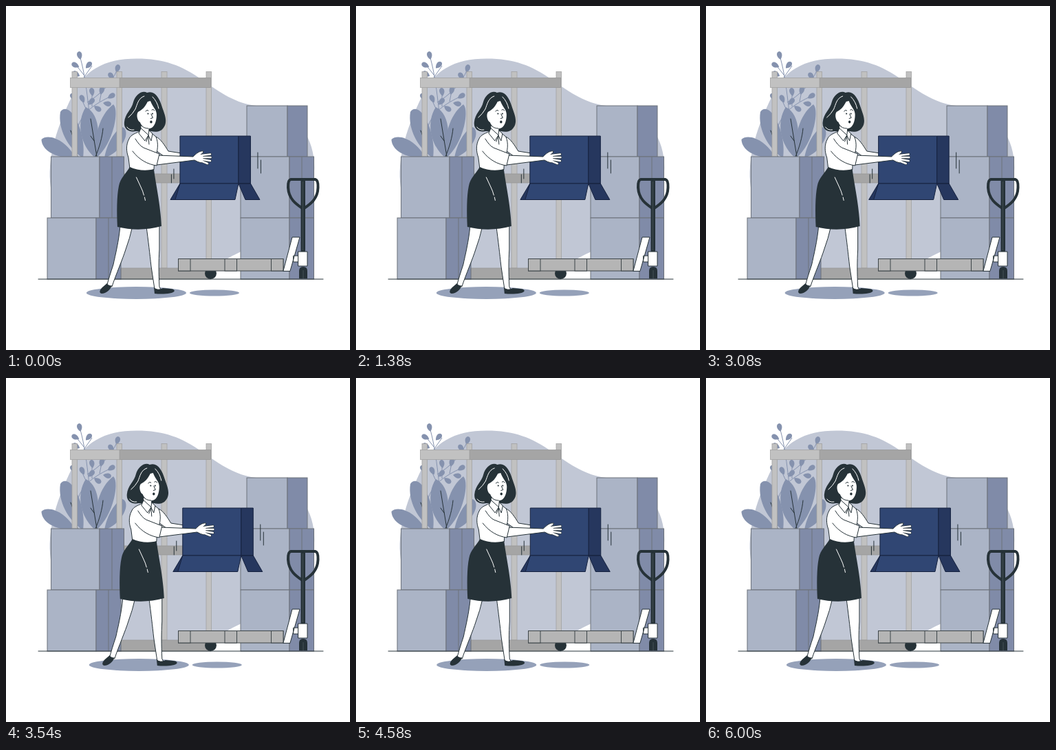
These frames come from a looping animation (500x500 px, 6.04 s). An HTML page:

```html
<!DOCTYPE html>
<html lang="en">
<head>
<meta charset="utf-8">
<title>Carrying a box</title>
<style>
  html, body { margin: 0; width: 100%; height: 100%; overflow: hidden; background: #fff; }
  svg { display: block; width: 100vw; height: 100vh; }
  .ink { fill: none; stroke: #263238; stroke-width: 1; stroke-linecap: round; stroke-linejoin: round; }
  .skin { fill: #fff; stroke: #263238; stroke-width: 1; stroke-linejoin: round; stroke-linecap: round; }
  .dark { fill: #263238; }
  .shine { fill: none; stroke: #fff; stroke-width: 1; stroke-linecap: round; }
  .leaf { fill: #8592ae; }
  .stem { fill: none; stroke: #8592ae; stroke-width: 1; }
  .front { fill: #abb4c6; stroke: #6c727b; }
  .side { fill: #808ba8; stroke: #6c727b; }
  .post { fill: #c1c1c1; stroke: #a2a2a2; stroke-width: .8; }
  .beam { fill: #a5a5a5; stroke: #969696; stroke-width: .8; }
  .pallet { fill: #b5b5b5; stroke: #3d4549; }
  .carton { fill: #304673; stroke: #16223f; stroke-linejoin: round; }
  .carton.shade { fill: #26375e; }
  .shadow { fill: #95a1b9; }
  .finger { fill: none; stroke: #fff; stroke-width: 2.6; stroke-linecap: round; }
  .finger.outline { stroke: #263238; stroke-width: 4; }
</style>
</head>
<body>
<svg viewBox="0 0 500 500">
  <path fill="#c1c7d5" d="M64 255C61 217 75 174 95 133C112 94 142 76.500 190 76.500C230 76.500 256 87 283 106C311 126 335 142 364 145C412 149 442 180 447 219C454 262 431 310 385 336C357 350 340 357 322 367C292 388 250 396 190 393C115 387 69 318 64 255Z"/>

  <g id="plant">
    <path class="stem" d="M126 200C120 150 117 105 107 72M113 104L125 87M113 100L102 86M104 178C110 154 130 142 153 131M117 151L110 136M125 146L125 126M136 139L139 124M118 140C135 130 152 115 162 92"/>
    <path class="leaf" d="M99 221C70 221 52 209 51.500 194C58 187 73 191 83 199C93 207 99 215 99 221Z"/>
    <path class="leaf" d="M112 221C90 207 75 178 79 154C84 146 93 150 99 160C109 176 115 200 112 221Z"/>
    <path class="leaf" d="M130 221C107 202 102 168 116 147C127 152 133 165 134 182C135 198 133 210 130 221Z"/>
    <path class="leaf" d="M131 221C127 190 136 158 156 143C161 148 160 162 157 175C152 194 144 210 131 221Z"/>
    <path class="leaf" d="M143 221C147 199 158 181 169 176C176 178 176 188 171 197C165 208 155 217 143 221Z"/>
    <path class="ink" d="M104 219C101 204 98 191 94 181M132 219L123 164M130 219C136 205 140 190 141 178M128 196L123 189"/>
  </g>

  <g id="shelf"></g>
  <g id="stacks"></g>

  <path class="ink" d="M47 397H461"/>

  <g id="shadows">
    <ellipse class="shadow" cx="189.500" cy="417" rx="72.500" ry="9"/>
    <ellipse class="shadow" cx="303" cy="417" rx="36" ry="4.500"/>
  </g>

  <g id="jack">
    <circle class="dark" cx="297.500" cy="388.500" r="8.500"/>
    <g id="pallet"></g>
    <path class="skin" d="M403 385L416 336H427L413 385ZM418 363H426V372H418Z"/>
    <path class="dark" d="M428.500 252H435V358H428.500ZM426 396V385Q426 379 432 379T438 385V396Z"/>
    <path d="M414 252H449.500Q454 253 453.500 264C453 281 442 288 432 295C422 288 411 281 410 264Q409.500 253 414 252Z" fill="none" stroke="#263238" stroke-width="4"/>
    <path d="M431.500 255V355M432 384V396" fill="none" stroke="#59666b" stroke-width=".6"/>
    <rect class="skin" x="425" y="357" width="13" height="21"/>
  </g>

  <g id="carrier">
    <g id="legs">
      <path class="skin" d="M166 320C164 342 159 362 156 376Q150 394 147 405L154 408C160 390 170 367 174 354Q180 338 184 320Z"/>
      <path class="skin" d="M204 320C207 342 209 360 211 378L216 411L226 414L223 408C222 389 222 370 223 354V318Z"/>
      <path class="dark" d="M147 403Q149 408 154 406C152 412 146 418 139 418C135 417 136 413 140 409Z"/>
      <path class="dark" d="M215 408C217 413 224 412 228 410C235 411 244 410 245 414C243 419 225 419 216 418Z"/>
    </g>

    <path class="skin" d="M218 190C225 193 231 203 236 211L255 214V219L229 218L214 207Z"/>

    <g id="carton">
      <path class="carton" d="M253 189H338V258H253Z"/>
      <path class="carton shade" d="M338 189H355.500V258H338ZM338 258H355.500L369 281.500H348ZM253 258L239 281.500H247Z"/>
      <path class="carton" d="M253 258H338L333 281.500H246Z"/>
    </g>
    <path class="ink" d="M244 237V251M240.500 245V257M366 213V236M370.500 224V243"/>

    <path class="dark" d="M205 126C198 122 188 129 185 140C183 150 173 156 172 169C171 179 179 184 189 182L211 182C219 184 226 182 229 177C236 168 230 156 227 147C223 133 216 122 205 126Z"/>
    <path class="skin" d="M196 174V181C190 185 182 186 179 193C174 202 175 212 178 220L180 236C190 240 205 241 215 238L216 222C221 211 222 199 218 190L208 182V175Z"/>
    <path fill="#fff" d="M206 139C202 147 198 151 192 154C189 158 191 167 195 169C197 175 203 179 209 178C216 177 219 167 219 158C219 150 213 147 210 138Z"/>
    <path class="ink" d="M196 173Q200 178 207 178M203 153Q205 150 207 152M212 151Q214 149 216 152M211 157L213.500 162.500L210.500 163.500"/>
    <circle class="dark" cx="206.500" cy="156.500" r="1.100"/>
    <circle class="dark" cx="213" cy="156.500" r="1.100"/>
    <ellipse class="dark" cx="211" cy="168.500" rx="1.700" ry="2"/>
    <path class="shine" d="M201 131C192 134 191 143 188 150Q184 157 178 162M176 176Q179 181 186 180M213 132Q220 139 222 149"/>
    <path class="skin" d="M196 178L193 185L202 196L207 188ZM208 181L207 188L211 196L213 186Z"/>
    <path class="ink" d="M207 189L204 197M207 189L208 201"/>

    <path class="dark" d="M180 234C190 239 205 240 215 237C217 255 225 290 226 320C205 326 182 326 162 321C161 300 161 276 164 262C166 250 175 243 180 234Z"/>
    <path class="shine" d="M189.500 249L196 263Q199 269 200.500 275M201.500 278L202.500 282.500"/>

    <g id="hand"></g>
    <path fill="#fff" d="M181 192C187 191 193 199 199 206L223 215L219 232C207 230 194 224 186 214Z"/>
    <path class="ink" d="M188 193Q194 203 200 206L223 215L219 232C206 230 194 224 184 211"/>
  </g>
</svg>
<script>
const byId = id => document.getElementById(id);

function shape(parent, tag, attributes) {
  const node = document.createElementNS("http://www.w3.org/2000/svg", tag);
  for (const [name, value] of Object.entries(attributes)) node.setAttribute(name, value);
  parent.append(node);
}

function rect(parent, type, left, top, right, bottom) {
  shape(parent, "rect", { class: type, x: left, y: top, width: right - left, height: bottom - top });
}

function sprigLeaf(x, y, angle, size = 6) {
  shape(byId("plant"), "path", {
    class: "leaf",
    d: `M0 ${size}C${-size} 0 ${-size * .6} ${-size} 0 ${-size}C${size * .6} ${-size} ${size} 0 0 ${size}Z`,
    transform: `translate(${x} ${y}) rotate(${angle})`
  });
}

function stackedBox(left, top, fold, right, bottom, seam) {
  const stacks = byId("stacks");
  rect(stacks, "front", left, top, fold, bottom);
  rect(stacks, "side", fold, top, right, bottom);
  if (seam) shape(stacks, "path", { class: "side", d: `M${seam} ${top}V${bottom}` });
}

function buildHand() {
  const hand = byId("hand");
  const fingers = "M284 217L297 215.500M285 220L297.500 220M285 223L297 225M283 225L293 229";
  shape(hand, "path", { class: "finger outline", d: fingers });
  shape(hand, "path", {
    class: "skin",
    d: "M221 217L272 219C277 214 282 210 287 211Q288 213 283 216L287 218V224L284 228Q279 227 274 224L219 231Z"
  });
  shape(hand, "path", { class: "finger", d: fingers });
}

function buildScene() {
  [[107, 72, -12], [101, 86, -62], [120, 86, 42], [102, 99, -60], [162, 91, 15],
   [153, 102, -35], [125, 125, -10], [139, 123, 15], [153, 131, 60], [147, 142, 100],
   [133, 149, 125], [111, 135, -25], [124, 139, 40], [98, 132, -40]]
    .forEach(leaf => sprigLeaf(...leaf));

  const shelf = byId("shelf");
  rect(shelf, "post", 226, 95.5, 234, 381);
  rect(shelf, "post", 291, 95.5, 298.5, 381);
  rect(shelf, "beam", 167, 244, 292, 257);
  rect(shelf, "beam", 167, 381, 297.5, 397);
  rect(shelf, "post", 96, 95.5, 103.5, 219);
  rect(shelf, "post", 161, 95.5, 168.5, 219);
  rect(shelf, "beam", 165, 104.5, 297.5, 118.5);
  rect(shelf, "post", 93.5, 104.5, 165, 118.5);

  stackedBox(65.5, 219, 136, 171.5, 308, 154);
  stackedBox(60, 308, 131, 167, 397, 149);
  stackedBox(350, 145, 409, 438, 219);
  stackedBox(341, 219, 412, 447.5, 308, 430);
  stackedBox(341, 308, 412, 447.5, 397, 430);

  const pallet = byId("pallet");
  rect(pallet, "pallet", 250.5, 367.5, 403, 385);
  [250.5, 318, 385.5].forEach(x => rect(pallet, "pallet", x, 367.5, x + 17.5, 385));

  buildHand();
}

const LOOP = 6040, FRAMES_PER_SECOND = 24, SHAKE_SECONDS = 6;
const SHAKE = [0, -1, 2, -4, 4, -4, 4, -4, 2, -1, 0];

function shakeOffset(time) {
  const step = Math.floor(time * FRAMES_PER_SECOND / 1000 + .15) + 1;
  const position = (step / FRAMES_PER_SECOND % SHAKE_SECONDS) / SHAKE_SECONDS * 10;
  const index = Math.floor(position);
  return SHAKE[index] + (SHAKE[index + 1] - SHAKE[index]) * (position - index);
}

function draw(time) {
  const move = `translate(${shakeOffset(time % LOOP).toFixed(3)} 0)`;
  byId("carrier").setAttribute("transform", move);
  byId("shadows").setAttribute("transform", move);
}

buildScene();
const start = performance.now();
function tick() {
  draw(performance.now() - start);
  requestAnimationFrame(tick);
}
tick();
</script>
</body>
</html>
```
